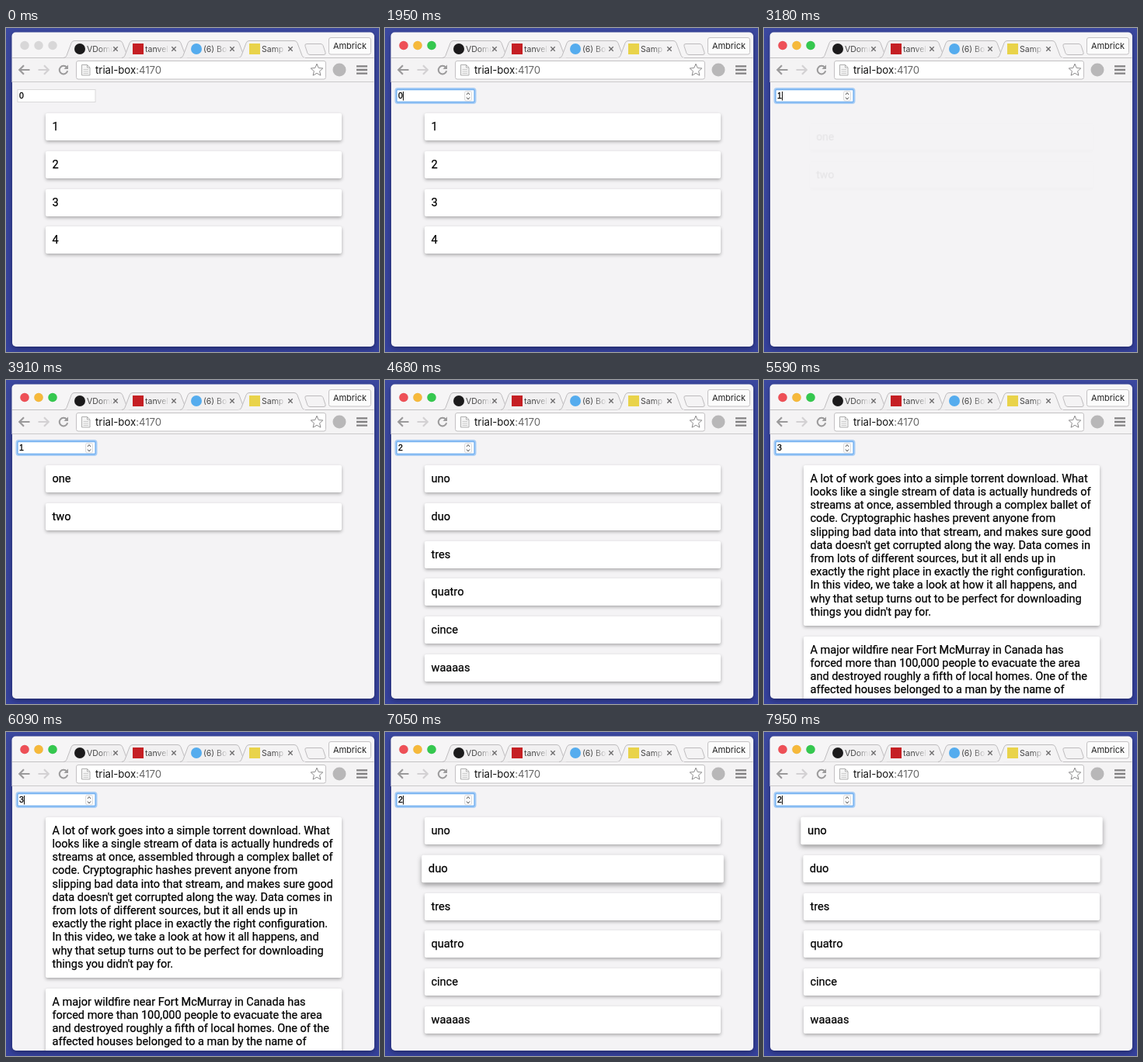
Recreate the animation shown at these times as an HTML page. Size 480 by 418 pixels, loop 8 s.

```html
<!DOCTYPE html>
<html lang="en">
<head>
<meta charset="utf-8">
<title>Card list</title>
<style>
  html, body { margin: 0; width: 100%; height: 100%; overflow: hidden; background: #36429b; }
  #stage { position: absolute; left: 0; top: 0; width: 480px; height: 418px; overflow: hidden;
    background: linear-gradient(#3b489f, #35419b); }
  #window { position: absolute; left: 7.5px; top: 5.5px; width: 466px; height: 405px;
    border-radius: 5px; background: #f4f3f5; box-shadow: 0 2px 6px rgba(0, 0, 20, .4); }
  svg { position: absolute; left: 0; top: 0; }
  svg text { font-family: Inter, "Liberation Sans", sans-serif; }

  #list { position: absolute; inset: 0 0 7.5px 0; overflow: hidden; }
  .card { position: absolute; left: 50.5px; width: 380.5px; box-sizing: border-box; padding: 8.8px 8.5px;
    background: #fff; border-radius: 2px; box-shadow: 0 2px 4px rgba(0, 0, 0, .3);
    font: 14.5px/17.2px Roboto, sans-serif; color: #000; -webkit-text-stroke: .25px; white-space: pre;
    animation: 8s linear infinite; }
  .numbers { animation-name: numbers; }
  .words { animation-name: words; }
  .latin { animation-name: latin; }
  .news { animation-name: news; }
  .latin.first { animation-name: latin, hover-first; }
  .latin.second { animation-name: latin, hover-second; }

  @keyframes numbers {
    0%, 37.5% { opacity: 1; transform: none; }
    39.2%, 100% { opacity: 0; transform: translateY(14px) scale(.955); }
  }
  @keyframes words {
    0%, 39.2% { opacity: 0; transform: translateY(14px) scale(.955); animation-timing-function: ease-in-out; }
    42.5%, 50% { opacity: 1; transform: none; }
    51.7%, 100% { opacity: 0; transform: translateY(14px) scale(.955); }
  }
  @keyframes latin {
    0%, 51.7% { opacity: 0; transform: translateY(14px) scale(.955); animation-timing-function: ease-in-out; }
    55%, 61.875% { opacity: 1; transform: none; }
    63.6%, 84.2% { opacity: 0; transform: translateY(14px) scale(.955); animation-timing-function: ease-in-out; }
    87.5%, 100% { opacity: 1; transform: none; }
  }
  @keyframes news {
    0%, 63.6% { opacity: 0; transform: translateY(14px) scale(.955); animation-timing-function: ease-in-out; }
    66.9%, 82.5% { opacity: 1; transform: none; }
    84.2%, 100% { opacity: 0; transform: translateY(14px) scale(.955); }
  }
  @keyframes hover-second {
    0%, 84.5% { scale: 1; box-shadow: 0 2px 4px rgba(0, 0, 0, .3); animation-timing-function: ease; }
    87.8%, 97.25% { scale: 1.02; box-shadow: 0 3px 6px rgba(0, 0, 0, .38); animation-timing-function: ease; }
    100% { scale: 1.003; box-shadow: 0 2px 4px rgba(0, 0, 0, .31); }
  }
  @keyframes hover-first {
    0%, 97.25% { scale: 1; box-shadow: 0 2px 4px rgba(0, 0, 0, .3); animation-timing-function: ease; }
    100% { scale: 1.02; box-shadow: 0 3px 6px rgba(0, 0, 0, .38); }
  }

  .focused, .caret, .digit { opacity: 0; animation: focus 8s step-end infinite; }
  .caret { animation-name: blink; }
  .d0 { animation-name: zero; }
  .d1 { animation-name: one; }
  .d2 { animation-name: two; }
  .d3 { animation-name: three; }
  @keyframes focus { 0% { opacity: 0; } 18.75%, 100% { opacity: 1; } }
  @keyframes zero { 0% { opacity: 1; } 37.5%, 100% { opacity: 0; } }
  @keyframes one { 0% { opacity: 0; } 37.5% { opacity: 1; } 50%, 100% { opacity: 0; } }
  @keyframes two { 0% { opacity: 0; } 50% { opacity: 1; } 61.875% { opacity: 0; } 82.5%, 100% { opacity: 1; } }
  @keyframes three { 0% { opacity: 0; } 61.875% { opacity: 1; } 82.5%, 100% { opacity: 0; } }
  @keyframes blink {
    0%, 25%, 43.75%, 56.25%, 68.125%, 80.625%, 88.75% { opacity: 0; }
    18.75%, 31.25%, 50%, 61.875%, 74.375%, 82.5%, 95%, 100% { opacity: 1; }
  }
  #field text { font: 10.5px "Liberation Sans", Arial, sans-serif; stroke: #000; stroke-width: .3; }
</style>
</head>
<body>
<div id="stage">
  <div id="window"></div>
  <div id="list"></div>
  <svg width="480" height="418" viewBox="0 0 480 418">
    <defs>
      <linearGradient id="fade" gradientUnits="userSpaceOnUse" x1="43" x2="57">
        <stop stop-color="#444"/><stop offset="1" stop-color="#444" stop-opacity=".12"/>
      </linearGradient>
    </defs>

    <path d="M7.5 38.5v-28a5 5 0 0 1 5-5h456a5 5 0 0 1 5 5v28z" fill="#f6f5f6"/>
    <g fill="#d8d7d8">
      <circle cx="24" cy="22.5" r="5.7"/><circle cx="42" cy="22.5" r="5.7"/><circle cx="60" cy="22.5" r="5.7"/>
    </g>
    <g class="focused">
      <circle cx="24" cy="22.5" r="5.7" fill="#ee5057"/>
      <circle cx="42" cy="22.5" r="5.7" fill="#f6b93b"/>
      <circle cx="60" cy="22.5" r="5.7" fill="#35c84f"/>
    </g>
    <path d="M387 20.5h18q2 0 3 2l3 9q1 3-2 3h-18q-2 0-3-2l-3-9q-1-3 2-3z" fill="#f4f3f4" stroke="#bdbbbd"/>
    <path d="M7.5 38.5h466" stroke="#c3c1c3"/>
    <g id="tabs"></g>

    <rect x="415.5" y="12.5" width="54" height="21.5" rx="2.5" fill="#fcfcfc" stroke="#c4c2c4"/>
    <text x="442.5" y="27.3" font-size="11" text-anchor="middle" fill="#222">Ambrick</text>

    <path d="M7.5 39h466v30.5h-466z" fill="#f4f3f4"/>
    <path d="M7.5 69.5h466" stroke="#cbc9cb"/>
    <g fill="none" stroke-width="2.2">
      <path d="M30.5 54h-13M23 48.3L17.3 54l5.7 5.7" stroke="#9b9a9b"/>
      <path d="M41.5 54h13M49 48.3l5.7 5.7-5.7 5.7" stroke="#d3d1d3"/>
      <path d="M78.2 50.8a5.3 5.3 0 1 0 1 4.5" stroke="#9b9a9b" stroke-width="2"/>
    </g>
    <path d="M80 47.5v5.5h-5.5z" fill="#9b9a9b"/>
    <rect x="90.5" y="42.5" width="321" height="23.5" rx="2.5" fill="#fff" stroke="#c3c1c3"/>
    <path d="M97.5 47.5h7l3.5 3.5v10h-10.5zM104.5 47.5v3.5h3.5" fill="#f4f4f4" stroke="#b0b0b0"/>
    <path d="M99.5 53.5h6.5M99.5 56h6.5M99.5 58.5h6.5" stroke="#ccc"/>
    <text x="115" y="58.8" font-size="13.2" fill="#111">trial-box<tspan fill="#666">:4170</tspan></text>
    <path d="M400 46.3l2.2 5.2 5.6.5-4.2 3.7 1.3 5.5-4.9-2.9-4.9 2.9 1.3-5.5-4.2-3.7 5.6-.5z"
      fill="#fff" stroke="#8b8a8b" stroke-linejoin="round"/>
    <circle cx="429" cy="54" r="8.5" fill="#b8b7b8"/>
    <path d="M451 49.3h14M451 54h14M451 58.7h14" stroke="#828182" stroke-width="2.3"/>

    <g id="field">
      <rect x="15" y="79.5" width="100" height="16" fill="#fff" stroke="#dad9da"/>
      <g class="focused">
        <rect x="14" y="78.5" width="102" height="18" rx="2.5" fill="none" stroke="#a9cdf5" stroke-width="3"/>
        <rect x="15" y="79.5" width="100" height="16" rx="1" fill="#fff" stroke="#6faef0" stroke-width="1.3"/>
        <rect x="102.5" y="81.5" width="9" height="12.5" rx="2" fill="#fafafa" stroke="#d5d4d5" stroke-width=".8"/>
        <path d="M105 86l2-2.5 2 2.5M105 89.5l2 2.5 2-2.5" fill="none" stroke="#555"/>
      </g>
      <text class="digit d0" x="17" y="91">0</text>
      <text class="digit d1" x="17" y="91">1</text>
      <text class="digit d2" x="17" y="91">2</text>
      <text class="digit d3" x="17" y="91">3</text>
      <path class="caret" d="M23.5 82v11.5" stroke="#111"/>
    </g>
  </svg>
</div>
<script>
  const LINE = 17.2, PADDING = 17.6, GAP = 14;
  const scenes = {
    numbers: ['1', '2', '3', '4'],
    words: ['one', 'two'],
    latin: ['uno', 'duo', 'tres', 'quatro', 'cince', 'waaaas'],
    news: [
`A lot of work goes into a simple torrent download. What
looks like a single stream of data is actually hundreds of
streams at once, assembled through a complex ballet of
code. Cryptographic hashes prevent anyone from
slipping bad data into that stream, and makes sure good
data doesn't get corrupted along the way. Data comes in
from lots of different sources, but it all ends up in
exactly the right place in exactly the right configuration.
In this video, we take a look at how it all happens, and
why that setup turns out to be perfect for downloading
things you didn't pay for.`,
`A major wildfire near Fort McMurray in Canada has
forced more than 100,000 people to evacuate the area
and destroyed roughly a fifth of local homes. One of the
affected houses belonged to a man by the name of
Edric Vanholm, who watched it burn from afar.`]
  };

  const list = document.getElementById('list');
  for (const [scene, texts] of Object.entries(scenes)) {
    let top = 110;
    texts.forEach((text, i) => {
      const card = document.createElement('div');
      card.className = `card ${scene} ${['first', 'second'][i] || ''}`;
      card.style.top = top + 'px';
      card.textContent = text;
      list.append(card);
      top += text.split('\n').length * LINE + PADDING + GAP;
    });
  }

  const dot = color => `<circle cx="19" cy="27" r="7" fill="${color}"/>`;
  const square = color => `<rect x="12" y="20" width="14" height="14" fill="${color}"/>`;
  const tabs = [
    ['VDomu', dot('#1b1a1b')],
    ['tanvel', square('#c51f24')],
    ['(6) Bo', dot('#55acee')],
    ['Samp', square('#e9d34a')]
  ];
  document.getElementById('tabs').innerHTML = tabs.map(([label, icon], i) => {
    const active = i === tabs.length - 1;
    return `<g transform="translate(${76 + 75 * i})">
      <path d="M-2 38.5q3 0 4-3l6-16q1-3 4-3h58q3 0 4 3l6 16q1 3 4 3"
        fill="${active ? '#f4f3f4' : '#f1f0f1'}" stroke="#bdbbbd"/>
      ${active ? '<path d="M-2 39h86" stroke="#f4f3f4" stroke-width="1.5"/>' : ''}
      ${icon}
      <text x="28" y="30.8" font-size="10.5" fill="url(#fade)">${label}</text>
      <path d="M62.3 24.3l5.4 5.4m0-5.4l-5.4 5.4" stroke="#6b6a6b" stroke-width="1.3"/>
    </g>`;
  }).join('');
</script>
</body>
</html>
```
